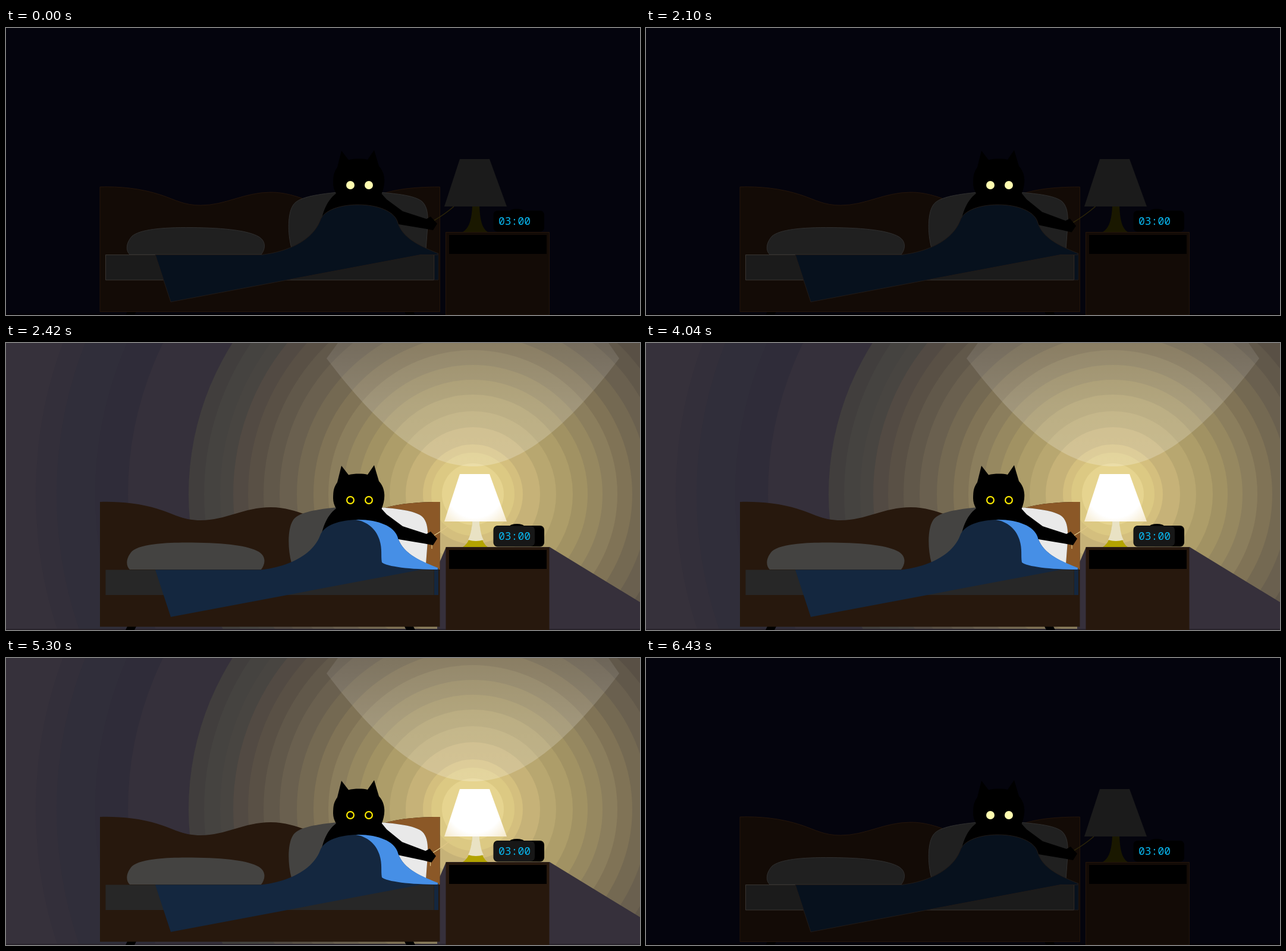
These frames come from a looping animation (1066 by 484 pixels, 7090 ms). An HTML page:

```html
<!DOCTYPE html>
<html lang="en">
<head>
<meta charset="utf-8">
<title>Lamp at night</title>
<style>
  html, body { margin: 0; width: 100%; height: 100%; overflow: hidden; background: #04040d; }
  svg {
    display: block; width: 1066px; height: 484px;
    --wall: #04040d; --wood: #130b06; --woodEdge: #24150b; --pillow: #202020; --pillowEdge: #303030;
    --sheet: #1b1b1b; --sheetEdge: #383430; --blanket: #07111d; --blanketEdge: #211b18;
    --shade: #1b1b1b; --base: #1a1800; --cord: #2b2409; --face: #000; --bottom: #030104;
  }
  svg.lit {
    --wall: #36313b; --wood: #27180d; --woodEdge: none; --pillow: #444341; --pillowEdge: none;
    --sheet: #272727; --sheetEdge: none; --blanket: #14273f; --blanketEdge: none;
    --shade: url(#shadeGlow); --base: #b2a300; --cord: #e0c787; --face: #171717; --bottom: #28232b;
  }
  .lit-only { display: none; }
  .lit .lit-only { display: inline; }
  .wood { fill: var(--wood); stroke: var(--woodEdge); }
  .pillow { fill: var(--pillow); stroke: var(--pillowEdge); }
  .sheet { fill: var(--sheet); stroke: var(--sheetEdge); }
  .blanket { fill: var(--blanket); stroke: var(--blanketEdge); }
  .eye { fill: #fffcb0; }
  .lit .eye { fill: #000; stroke: #ffec00; stroke-width: 2.2; r: 5.9px; }
  #cord, #tail { fill: none; stroke: var(--cord); stroke-width: 1.6; }
  .lit #cord, .lit #tail { stroke-width: 1.2; }
  text { font: 18px "Noto Sans Mono", "DejaVu Sans Mono", monospace; fill: #08b8f0; }
</style>
</head>
<body>
<svg id="scene" viewBox="0 0 1066 484">
  <defs>
    <radialGradient id="shadeGlow" gradientUnits="userSpaceOnUse" cx="788" cy="248" r="72">
      <stop offset=".65" stop-color="#fff"/><stop offset="1" stop-color="#f6ebcf"/>
    </radialGradient>
    <linearGradient id="beam" x2="0" y2="1">
      <stop offset="0" stop-color="#fff" stop-opacity=".08"/>
      <stop offset=".5" stop-color="#fff" stop-opacity=".18"/>
      <stop offset="1" stop-color="#fff" stop-opacity=".22"/>
    </linearGradient>
    <clipPath id="brightSide"><path d="M592 260H740V382H592Z"/></clipPath>
    <path id="headboard" d="M158 268C190 267 226 270 262 282C285 290 300 299 327 299C370 299 400 277 445 277C470 277 488 284 503 289H610C640 273 680 268 729.5 268V478.500H158Z"/>
    <path id="bigPillow" d="M480 371C473 345 474 313 482 300C488 288 510 282 553 277.500L633 277.500C665 280 690 284 700 293C710 303 710 320 708.500 340L706 373Z"/>
  </defs>

  <rect width="1066" height="484" fill="var(--wall)"/>
  <g class="lit-only">
    <g id="glow"></g>
    <path d="M558 0L539 26C640 160 715 208 785 208S930 160 1031 26L1013 0Z" fill="url(#beam)"/>
    <path d="M914 344L1066 437V484H725V379L740 344Z" fill="#36303b"/>
  </g>
  <path d="M0 483H1066" stroke="var(--bottom)" stroke-width="2"/>

  <path d="M204 478H219L216 484H201ZM670 478H685L688 484H673Z"/>
  <use href="#headboard" class="wood"/>
  <use href="#headboard" class="lit-only" fill="#8b5827" clip-path="url(#brightSide)"/>
  <use href="#bigPillow" class="pillow"/>
  <use href="#bigPillow" class="lit-only" fill="#e9e9e9" clip-path="url(#brightSide)"/>
  <path class="pillow" d="M208 382C200 374 203 361 212 351C225 340 260 336 312 336.500C370 337 408 342 425 352C438 360 436 373 429 382Z"/>
  <path class="sheet" d="M167.500 382.500H719.500V425H167.500Z"/>
  <path class="blanket" stroke="none" d="M720 380H727V425H720Z"/>

  <path id="tail" class="lit-only"/>
  <path d="M550 262C550 248 552 242 557 235L564 207L576 222.500C585 220 600 220 608 222L619 206L627 233C638 245 639 262 631 281L660 315V345H528C529 315 539 291 555 279C552 274 550 268 550 262Z"/>
  <path id="cord"/>
  <path id="arm" d="M631 279L640 289L667 309L707 322L714 318L725 330L718 341L705 338.500L660 331L620 322V285Z"/>
  <circle class="eye" cx="579" cy="265" r="7"/>
  <circle class="eye" cx="610" cy="265" r="7"/>

  <path class="blanket" d="M251 382.500H430C475 377 515 358 528 325C534 307 562 298 592 298C625 298 652 309 658 326C666 353 690 365 726 380V382.500H697L277 462Z"/>
  <path class="lit-only" fill="#468fe6" d="M588 298C625 297 652 309 658 326C666 353 690 365 726 379V382C680 382 640 377 632 370C630 358 633 348 628 332C622 313 607 301 588 298Z"/>

  <path fill="var(--base)" d="M784 300H796C797 325 801 338 810 344H768C778 338 783 325 784 300Z"/>
  <path class="lit-only" fill="#e9e2c4" d="M784 300H796C797 315 799 325 803 332Q790 336 777 332C781 324 783 315 784 300Z"/>
  <path fill="var(--shade)" d="M763 221H813L842 301H737Z"/>

  <path class="wood" d="M739.500 344.500H913.500V484H739.500Z"/>
  <path d="M745 349H909V381H745Z"/>
  <ellipse cx="859" cy="309" rx="12" ry="4"/>
  <rect x="819.500" y="308" width="85.500" height="35.500" rx="7"/>
  <rect x="820" y="308.500" width="69" height="34.500" rx="7" fill="var(--face)"/>
  <text x="828" y="331.500">03:00</text>
</svg>

<script>
const LOOP = 7090;
// Each pose: end time in ms, lamp on, arm angle in degrees
const poses = [
  [2100, false, 0], [2280, false, 2.6], [2420, false, 4.6],
  [5120, true, 0], [5300, true, 6.2], [5440, true, 2.8], [LOOP, false, 0]
];

// Glow bands around the lamp: radius and colour, outermost first
const bands = [
  [735, '#332f3a'], [700, '#302e3a'], [635, '#2f2c39'], [580, '#35303b'],
  [478, '#413e3d'], [452, '#454340'], [425, '#484541'], [403, '#524a43'],
  [378, '#595045'], [352, '#61584a'], [325, '#6a604f'], [296, '#746952'],
  [268, '#807356'], [243, '#8b7e5d'], [218, '#968860'], [193, '#a19263'],
  [168, '#ad9d69'], [140, '#b8a770'], [113, '#c6b278'], [84, '#d4bf7e'],
  [70, '#dcc983'], [52, '#e6d48f']
];
const $ = id => document.getElementById(id);
$('glow').innerHTML = bands.map(([r, color]) =>
  `<circle cx="785" cy="255" r="${r}" fill="${color}"/>`).join('');

const PIVOT = { x: 640, y: 290 };
function turn(x, y, degrees) {
  const a = degrees * Math.PI / 180, dx = x - PIVOT.x, dy = y - PIVOT.y;
  return [PIVOT.x + dx * Math.cos(a) - dy * Math.sin(a),
          PIVOT.y + dx * Math.sin(a) + dy * Math.cos(a)];
}

function draw(now) {
  const t = now % LOOP;
  const [, lit, angle] = poses.find(([end]) => t < end);
  $('scene').classList.toggle('lit', lit);
  $('arm').setAttribute('transform', `rotate(${angle} ${PIVOT.x} ${PIVOT.y})`);

  const [hx, hy] = turn(719, 325, angle);
  const topX = 753 + Math.min(angle, 4);
  $('cord').setAttribute('d', `M${hx} ${hy}Q${(hx + topX) / 2 + 2} ${(hy + 301) / 2 + 1} ${topX} 301`);
  const [tx, ty] = turn(716, 338, angle);
  $('tail').setAttribute('d', `M${tx} ${ty}V${ty + 9}`);
  requestAnimationFrame(draw);
}
requestAnimationFrame(draw);
</script>
</body>
</html>
```
